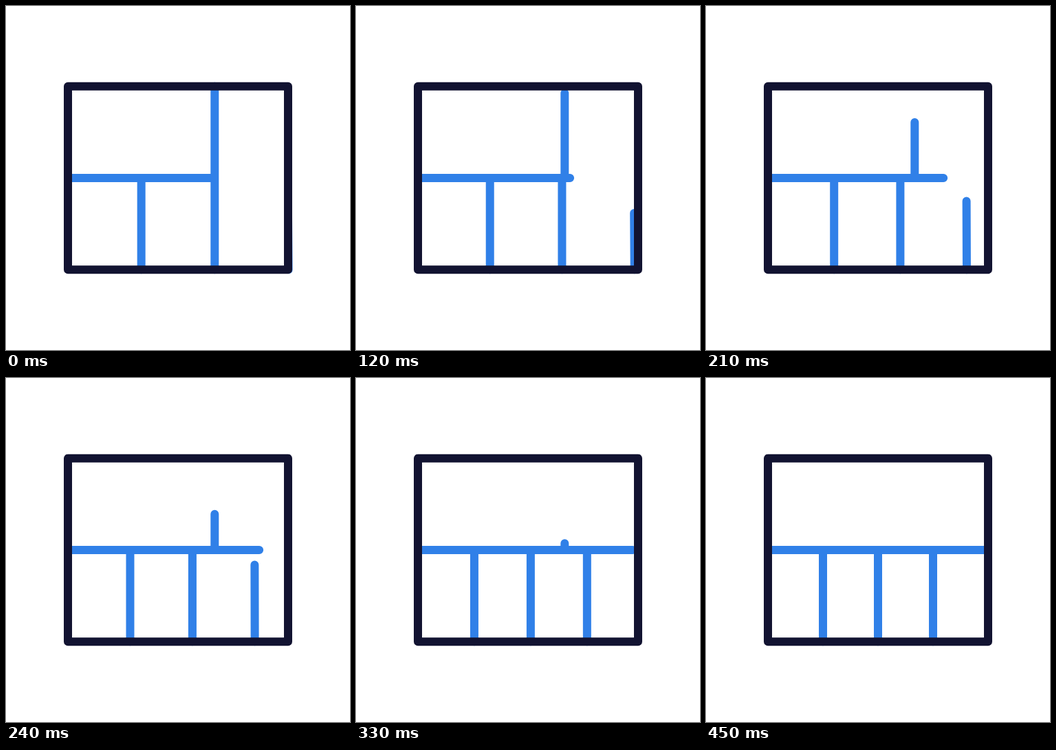
An HTML page that plays this animation: 500x500 px, repeating every 490 ms.

```html
<!DOCTYPE html>
<html lang="en">
<head>
<meta charset="utf-8">
<title>Layout icon</title>
<style>
  html, body { margin: 0; width: 100%; height: 100%; overflow: hidden; background: #fff; }
  svg { display: block; width: 100%; height: 100%; }
  path { fill: none; stroke-width: 12; stroke-linecap: round; stroke-linejoin: round; }
</style>
</head>
<body>
<svg viewBox="0 0 500 500">
  <path id="dividers" stroke="#3080e8"/>
  <path stroke="#121331" d="M90 116.67H410V383.33H90Z"/>
</svg>
<script>
const LOOP = 490, STEP = 30, MOVE = 450;
const TOP = 116.67, MIDDLE = 250, BOTTOM = 383.33;
const dividers = document.getElementById('dividers');

// cubic-bezier(.7, 0, .3, 1), solved by bisection
function ease(x) {
  if (x <= 0 || x >= 1) return x <= 0 ? 0 : 1;
  let low = 0, high = 1, s;
  for (let i = 0; i < 30; i++) {
    s = (low + high) / 2;
    const r = 1 - s;
    if (2.1 * s * r * r + 0.9 * s * s * r + s * s * s < x) low = s;
    else high = s;
  }
  return s * s * (3 - 2 * s);
}

function draw(now) {
  const time = Math.min(Math.floor(now % LOOP / STEP) * STEP, MOVE);
  const p = ease(time / MOVE);
  const mix = (from, to) => from + (to - from) * p;
  const line = (x1, y1, x2, y2) => `M${x1} ${y1}L${x2} ${y2}`;
  const left = mix(196.67, 170), center = mix(303.33, 250);

  dividers.setAttribute('d',
    line(90, MIDDLE, mix(303.33, 410), MIDDLE) +
    line(303.33, mix(TOP, MIDDLE), 303.33, MIDDLE) +
    line(left, MIDDLE, left, BOTTOM) +
    line(center, MIDDLE, center, BOTTOM) +
    line(mix(410, 330), mix(305, MIDDLE), mix(410.6, 330), BOTTOM));
}

function tick() {
  draw(performance.now());
  requestAnimationFrame(tick);
}
tick();
</script>
</body>
</html>
```
